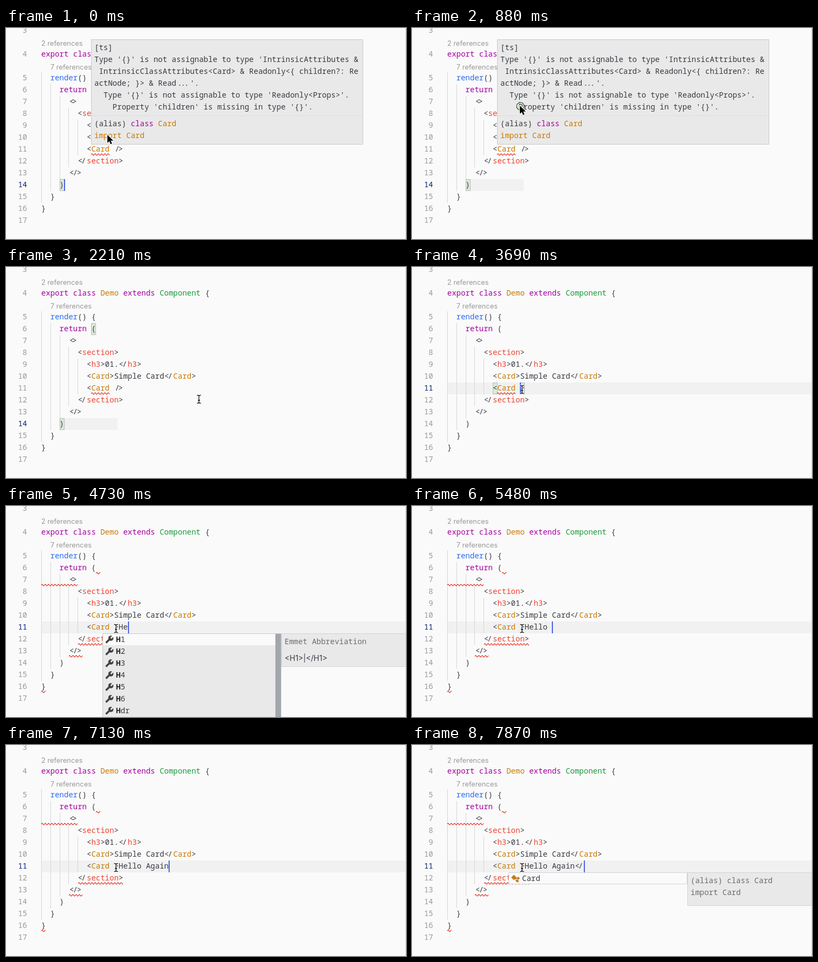
These frames come from a looping animation (738x391 px, 8000 ms). An HTML page with a canvas:

```html
<!DOCTYPE html>
<html lang="en">
<head>
<meta charset="utf-8">
<title>Editor session</title>
<style>
html, body { margin: 0; width: 100%; height: 100%; overflow: hidden; background: #fafafa; }
canvas { display: block; width: 738px; height: 391px; }
</style>
</head>
<body>
<canvas id="stage"></canvas>
<script>
const W = 738, H = 391, LOOP = 8000, CELL = 8.4, LEFT = 65;
const MONO = '"Noto Sans Mono", "DejaVu Sans Mono", monospace';
const SANS = 'Inter, "Open Sans", sans-serif';
const INK = '#383a42', KEY = '#a3009f', CLS = '#c87a00', TAG = '#f0412f',
      FN = '#2a6af0', TYPE = '#1a9a3c', DIM = '#999', PANEL = '#e9e9e9', EDGE = '#c8c8c8';

const cv = document.getElementById('stage');
const g = cv.getContext('2d');
const dpr = window.devicePixelRatio || 1;
cv.width = W * dpr;
cv.height = H * dpr;

const colX = c => LEFT + c * CELL;
const rowTop = n => n < 5 ? 38 + 44 * (n - 4) : 82 + 22 * (n - 5);

// Start column, then text/colour pairs, keyed by line number
const code = {
  4: [0, 'export class ', KEY, 'Demo ', CLS, 'extends ', KEY, 'Component ', TYPE, '{', INK],
  5: [2, 'render', FN, '() {', INK],
  6: [4, 'return ', KEY, '(', INK],
  7: [6, '<>', INK],
  8: [8, '<', INK, 'section', TAG, '>', INK],
  9: [10, '<', INK, 'h3', TAG, '>01.', INK, '</', INK, 'h3', TAG, '>', INK],
  10: [10, '<', INK, 'Card', CLS, '>Simple Card</', INK, 'Card', CLS, '>', INK],
  12: [8, '</', INK, 'section', TAG, '>', INK],
  13: [6, '</>', INK],
  14: [4, ')', INK],
  15: [2, '}', INK],
  16: [0, '}', INK]
};

// Time, text after "<Card ", caret column
const typing = [
  [0, '/>', -1], [3250, '/>', 17], [3690, '>', 16], [3990, '>', 17],
  [4590, '>H', 18], [4730, '>He', 19], [4880, '>Hell', 21], [5180, '>Hello', 22],
  [5480, '>Hello ', 23], [5930, '>Hello A', 24], [6230, '>Hello Aga', 26],
  [6380, '>Hello Again', 28], [6680, '>Hello Again<', 29], [7130, '>Hello Again', 28],
  [7570, '>Hello Again<', 29], [7720, '>Hello Again</', 30]
];

// Time, x, y, click ring radius
const mouse = [
  [0, 187, 198, 0], [150, 189, 187, 0], [300, 193, 168, 0], [440, 196, 151, 0], [590, 197, 144, 0],
  [880, 199, 144, 7], [1030, 232, 144, 10], [1180, 318, 144, 10], [1330, 428, 144, 10],
  [1480, 515, 144, 10], [1630, 526, 144, 15], [1770, 528, 144, 0], [2070, 450, 192, 0],
  [2210, 356, 245, 0], [2510, 340, 244, 0], [2660, 298, 239, 0], [2810, 246, 231, 0],
  [2960, 212, 227, 0], [3100, 203, 227, 0]
];

const at = (list, t) => list.reduce((a, k) => t >= k[0] ? k : a);

function box(x, y, w, h, fill, edge) {
  g.fillStyle = fill;
  g.fillRect(x, y, w, h);
  if (!edge) return;
  g.strokeStyle = edge;
  g.lineWidth = 1;
  g.strokeRect(x + .5, y + .5, w - 1, h - 1);
}

const joins = { '</>': [1.5, 0, -1.5], '</': [.5, -1.5], '/>': [1.5, -.5], '<>': [1.5, -1.5], '...': [2, 0, -2] };

// Monospace text on a fixed grid, with joined bracket pairs
function mono(s, x, y, color, weight = 400) {
  g.font = `${weight} 14px ${MONO}`;
  g.fillStyle = color;
  g.textAlign = 'left';
  const shift = [];
  for (const m of s.matchAll(/<\/>|<\/|\/>|<>|\.\.\./g))
    joins[m[0]].forEach((d, i) => shift[m.index + i] = d);
  for (let i = 0; i < s.length; i++)
    if (s[i] !== ' ') g.fillText(s[i], x + i * CELL + (shift[i] || 0), y);
}

function runs(x, y, parts) {
  for (let i = 0; i < parts.length; i += 2) {
    mono(parts[i], x, y, parts[i + 1]);
    x += parts[i].length * CELL;
  }
}

function sans(s, x, y, size, color) {
  g.font = `${size}px ${SANS}`;
  g.fillStyle = color;
  g.textAlign = 'left';
  g.fillText(s, x, y);
}

function squiggle(line, x0, x1) {
  const y = rowTop(line) + 20.5;
  g.beginPath();
  for (let x = x0; x <= x1; x += .5) g.lineTo(x, y - 1.4 * Math.sin((x - x0) * Math.PI / 3));
  g.strokeStyle = '#e8180c';
  g.lineWidth = 1.1;
  g.stroke();
}

const bracket = (c, line) => box(Math.round(colX(c)), rowTop(line), 9, 22, '#dce8dc', '#b9b9b9');

function caret(c, line) {
  box(Math.round(colX(c)), rowTop(line), 2, 22, '#4a63e8');
}

function editor(t) {
  const [, tail, col] = at(typing, t);
  const onCard = t >= 3250, broken = t >= 4140, active = onCard ? 11 : 14;

  if (onCard) box(LEFT, rowTop(11), W - LEFT, 22, '#f1f1f1');
  else if (t >= 440) box(107, rowTop(14), 99, 22, '#f1f1f1');

  for (let i = 0; i < 5; i++)
    box(Math.round(colX(i * 2)), rowTop(5 + i), 1, rowTop(16 - i) - rowTop(5 + i), '#d6d6d6');
  box(737, 0, 1, H, '#dcdcdc');

  if (!onCard) {
    bracket(4, 14);
    bracket(11, 6);
  } else if (t < 4590) {
    bracket(10, 11);
    bracket(t < 3690 ? 17 : 16, 11);
  }

  for (let n = 3; n <= 17; n++) {
    const s = String(n);
    mono(s, 39 - s.length * CELL, rowTop(n) + 15, n === active ? '#0b216f' : DIM);
    if (code[n]) runs(colX(code[n][0]), rowTop(n) + 15, code[n].slice(1));
  }
  runs(colX(10), rowTop(11) + 15, ['<', INK, 'Card ', CLS, tail, INK]);
  sans('2 references', 65, 33, 12.8, DIM);
  sans('7 references', 82, 77, 12.8, DIM);

  if (broken) {
    squiggle(6, 166, 174);
    squiggle(7, 65, 132);
    squiggle(12, 133, 216);
    squiggle(13, 116, 141);
    squiggle(16, 65, 73);
  } else squiggle(11, 157, 191);

  if (col > 0) caret(col, 11);
  else if (t < 440) caret(5, 14);
}

function hover(t) {
  box(157, 21, 502, 195, PANEL, EDGE);
  box(158, 162, 500, 1, '#dedede');
  if (t >= 880) {
    const end = Math.min(516, at(mouse, t)[1] + 1);
    box(197, 136, end - 197, 20, '#a8f06e');
  }
  [
    '[ts]',
    "Type '{}' is not assignable to type 'IntrinsicAttributes &",
    ' IntrinsicClassAttributes<Card> & Readonly<{ children?: Re',
    "actNode; }> & Read...'.",
    "  Type '{}' is not assignable to type 'Readonly<Props>'.",
    "    Property 'children' is missing in type '{}'."
  ].forEach((s, i) => mono(s, 163, 41 + 22 * i, INK));
  runs(163, 182, ['(alias) ', INK, 'class ', KEY, 'Card', CLS]);
  runs(163, 204, ['import Card', CLS]);
}

function wrench(y, back) {
  g.strokeStyle = g.fillStyle = '#424242';
  g.lineCap = 'round';
  g.lineWidth = 3.6;
  g.beginPath();
  g.moveTo(185.5, y + 5.5);
  g.lineTo(192, y - 1);
  g.stroke();
  g.beginPath();
  g.arc(193.5, y - 2, 4.8, 0, 7);
  g.fill();
  g.strokeStyle = back;
  g.lineCap = 'butt';
  g.lineWidth = 3;
  g.beginPath();
  g.moveTo(193.5, y - 2);
  g.lineTo(199, y - 7.5);
  g.stroke();
}

function classIcon(y) {
  const gem = (x, cy, r) => {
    g.beginPath();
    g.moveTo(x - r, cy);
    g.lineTo(x, cy - r);
    g.lineTo(x + r, cy);
    g.lineTo(x, cy + r);
    g.fill();
  };
  box(190, y - 1, 5, 1.5, '#c27d1a');
  box(191, y, 1.5, 5, '#c27d1a');
  gem(188, y - 1.5, 5);
  gem(196, y, 3);
  gem(194.5, y + 5, 3);
}

function details() {
  box(508, 236, 230, 62, PANEL, '#d2d2d2');
}

function abbreviations(items, thumb) {
  box(178, 236, 330, 160, PANEL, EDGE);
  box(179, 237, 318, 21, '#fafafa');
  items.forEach((s, i) => {
    const y = 247 + 22 * i;
    wrench(y, i ? PANEL : '#fafafa');
    mono(s[0], 203, y + 5, '#222', 700);
    mono(s.slice(1), 203 + CELL, y + 5, INK);
  });
  box(497, 237, 10, thumb - 237, '#a2a6ad');
  details();
  mono('Emmet Abbreviation', 514, 256, '#6c6c6c');
  sans(`<${items[0]}>|</${items[0]}>`, 514, 287, 14, INK);
}

function cardHint() {
  box(178, 236, 330, 22, '#fafafa', '#d2d2d2');
  classIcon(247);
  mono('Card', 203, 252, INK);
  details();
  mono('(alias) class Card', 514, 256, '#6c6c6c');
  mono('import Card', 514, 278, '#6c6c6c');
}

function arrow(x, y) {
  g.beginPath();
  [[0, 0], [0, 15], [3.5, 11.8], [6, 17.2], [8.6, 16], [6.2, 10.8], [11, 10.8]]
    .forEach(([a, b]) => g.lineTo(x + a, y + b));
  g.closePath();
  g.lineJoin = 'round';
  g.strokeStyle = '#fff';
  g.lineWidth = 2;
  g.stroke();
  g.fillStyle = '#000';
  g.fill();
}

function beam(x, y) {
  for (const [color, width] of [['#fff', 3], ['#111', 1.3]]) {
    g.beginPath();
    for (const s of [-1, 1]) {
      g.moveTo(x - 3.5, y + 7.5 * s);
      g.quadraticCurveTo(x, y + 7.5 * s, x, y + 5.5 * s);
      g.quadraticCurveTo(x, y + 7.5 * s, x + 3.5, y + 7.5 * s);
    }
    g.moveTo(x, y - 6);
    g.lineTo(x, y + 6);
    g.moveTo(x - 2, y + 2);
    g.lineTo(x + 2, y + 2);
    g.strokeStyle = color;
    g.lineWidth = width;
    g.stroke();
  }
}

function pointer(t) {
  const [, x, y, ring] = at(mouse, t);
  if (ring) {
    g.beginPath();
    g.arc(x + 1, y + 1, ring, 0, 7);
    g.strokeStyle = ring > 10 ? 'rgba(40,40,40,.4)' : '#333';
    g.lineWidth = 1.2;
    g.stroke();
  }
  if (t < 2210) arrow(x, y);
  else beam(x, y);
}

function draw(t) {
  g.setTransform(dpr, 0, 0, dpr, 0, 0);
  g.lineCap = 'butt';
  g.textBaseline = 'alphabetic';
  box(0, 0, W, H, '#fafafa');
  editor(t);
  if (t < 2210) hover(t);
  if (t >= 4730 && t < 4880) abbreviations(['H1', 'H2', 'H3', 'H4', 'H5', 'H6', 'Hdr'], H);
  if (t >= 6080 && t < 6230) abbreviations(['A', 'A:link', 'A:mail', 'A:tel', 'Abbr', 'Acr', 'Acronym'], 381);
  if (t >= 7720) cardHint();
  pointer(t);
}

const start = performance.now();
function tick() {
  draw((performance.now() - start) % LOOP);
  requestAnimationFrame(tick);
}
tick();
</script>
</body>
</html>
```
